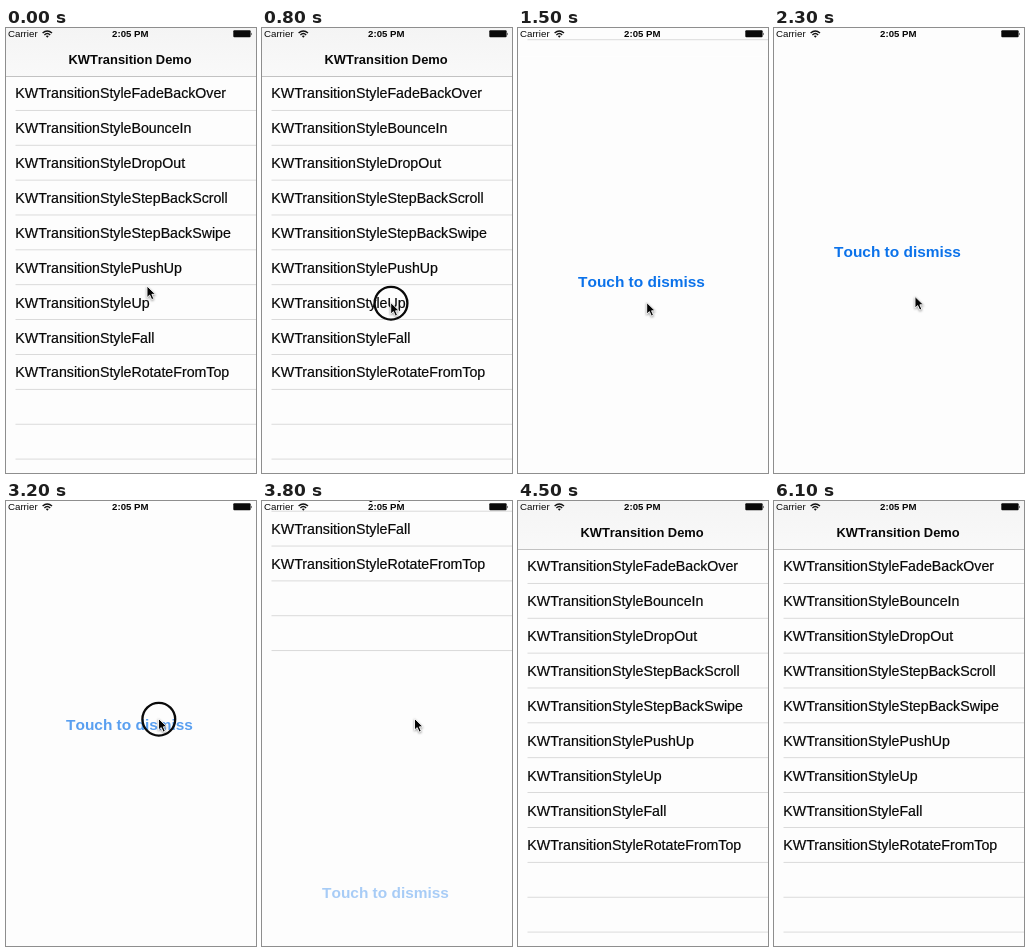
Recreate the animation shown at these times as an HTML page. Size 250 by 445 pixels, loop 6200 ms.

```html
<!DOCTYPE html>
<html lang="en">
<head>
<meta charset="utf-8">
<title>Transition demo</title>
<style>
  html, body { margin: 0; width: 100%; height: 100%; overflow: hidden; background: #000; }
  svg { display: block; width: 100vw; height: 100vh; }
  text { font-family: "Liberation Sans", Arial, sans-serif; font-kerning: none; fill: #080808; }
  .row { font-size: 14.2px; font-kerning: normal; stroke: #080808; stroke-width: 0.2px; }
  .title { font-size: 12.9px; font-weight: bold; text-anchor: middle; }
  .status { font-size: 9.7px; }
  .time { font-size: 9.65px; font-weight: bold; text-anchor: middle; }
  .dismiss { font-size: 15.45px; font-weight: bold; text-anchor: middle; fill: #0b72ea; }
  #cursor { filter: drop-shadow(0 1px 0.8px rgba(0, 0, 0, 0.4)); }
</style>
</head>
<body>
<svg viewBox="0 0 250 445">
  <defs>
    <linearGradient id="bar" x2="0" y2="1">
      <stop stop-color="#f4f4f4"/><stop offset="1" stop-color="#f9f9f9"/>
    </linearGradient>
    <linearGradient id="dark" x2="0" y2="1">
      <stop stop-opacity="0.14"/><stop offset="1" stop-opacity="0"/>
    </linearGradient>
  </defs>
  <rect width="250" height="445"/>
  <g id="list">
    <rect y="-2" width="250" height="453" fill="#fdfdfd"/>
    <rect y="-2" width="250" height="50.5" fill="url(#bar)"/>
    <rect id="shade" y="-2" width="250" height="50.5" fill="url(#dark)"/>
    <rect y="48" width="250" height="0.8" fill="#b4b4b4"/>
    <text class="title" x="124.1" y="35.6">KWTransition Demo</text>
    <g id="rows"></g>
  </g>
  <g id="modal">
    <rect y="-2" width="250" height="450" fill="#fdfdfd"/>
    <text id="dismiss" class="dismiss" x="123.5" y="228.6">Touch to dismiss</text>
  </g>
  <g id="status">
    <text class="status" x="2" y="9.3">Carrier</text>
    <g fill="none" stroke="#111" stroke-width="1.4">
      <path d="M36.6 5.1Q41.3 0.9 46 5.1"/>
      <path d="M38.4 6.9Q41.3 4.3 44.2 6.9"/>
    </g>
    <path d="M39.8 8.1Q41.3 6.9 42.8 8.1L41.3 9.7Z" fill="#111"/>
    <text class="time" x="124.3" y="9.3">2:05 PM</text>
    <rect x="227.3" y="2.3" width="17.3" height="7" rx="1" fill="#0a0a0a"/>
    <path d="M245.1 4.4Q246.6 5.9 245.1 7.4Z" fill="#0a0a0a"/>
  </g>
  <circle id="ring" r="16.4" fill="none" stroke="#0a0a0a" stroke-width="2.3"/>
  <path id="cursor" d="M0 0V11.6L2.7 9.1L4.7 13.6L6.8 12.7L4.9 8.3H8.5Z"
        fill="#050505" stroke="#fff" stroke-width="0.9" stroke-linejoin="round"/>
</svg>
<script>
const LOOP = 6200, STEP = 100;
const SCREEN = 450;               // travel of a full-screen slide
const OPEN = 1340.7, CLOSE = 3740.7;
const ROW_TOP = 48, ROW_H = 34.87;
const styles = ["FadeBackOver", "BounceIn", "DropOut", "StepBackScroll", "StepBackSwipe",
                "PushUp", "Up", "Fall", "RotateFromTop"];
const PICKED = styles.indexOf("Up");

const $ = id => document.getElementById(id);
const show = (el, on) => el.setAttribute("visibility", on ? "visible" : "hidden");
const move = (el, x, y) => el.setAttribute("transform", `translate(${x} ${y})`);
const clamp = v => Math.min(1, Math.max(0, v));
const within = (t, a, b) => t >= a && t < b;

function buildRows() {
  let out = "";
  for (let i = 1; i <= 11; i++) {
    out += `<rect x="9.5" y="${ROW_TOP + i * ROW_H - 0.9}" width="241" height="0.8" fill="#d2d2d2"/>`;
  }
  out += `<rect id="picked" y="${ROW_TOP + PICKED * ROW_H - 0.9}" width="250" height="${ROW_H + 0.8}" fill="#c9c9c9"/>`;
  styles.forEach((name, i) => {
    out += `<text class="row" x="9.3" y="${ROW_TOP + (i + 0.5) * ROW_H + 5}">KWTransitionStyle${name}</text>`;
  });
  $("rows").innerHTML = out;
}

// Underdamped spring from 0 to 1, damping ratio 0.8
function spring(ms) {
  if (ms <= 0) return 0;
  if (ms > 440) return 1;
  const q = 0.0202 * ms;
  return 1 - Math.exp(-0.8 * q) * (Math.cos(0.6 * q) + 4 / 3 * Math.sin(0.6 * q));
}

// Pointer path: time, x, y
const path = [
  [0, 141, 258], [400, 128.7, 274.5], [2000, 128.7, 274.5], [2300, 141, 268.5],
  [2600, 152.5, 217.5], [3800, 152.5, 217.5], [4000, 152.5, 214],
  [4300, 152.5, 214], [4400, 137, 209]
];

function pointer(t) {
  const i = path.findIndex(k => k[0] > t);
  if (i < 0) return path[path.length - 1].slice(1);
  const [t0, x0, y0] = path[i - 1], [t1, x1, y1] = path[i];
  const u = (t - t0) / (t1 - t0);
  return [x0 + (x1 - x0) * u, y0 + (y1 - y0) * u];
}

function draw(time) {
  const t = Math.floor((time % LOOP) / STEP) * STEP;
  const back = t >= CLOSE;
  const p = spring(t - (back ? CLOSE : OPEN));
  const listY = SCREEN * (back ? p - 1 : -p);

  move($("list"), 0, listY);
  move($("modal"), 0, listY + SCREEN);
  show($("picked"), within(t, 900, 2000));
  // the translucent bar darkens as black shows above it
  $("shade").setAttribute("opacity", clamp(listY / 6.5));
  $("dismiss").setAttribute("opacity", 1 - 0.65 * clamp((t - 3100) / 200));

  const [x, y] = pointer(t);
  move($("cursor"), x, y);
  move($("ring"), x + 0.3, y + 0.7);
  show($("cursor"), t < 4500);
  show($("ring"), within(t, 800, 1400) || within(t, 3100, 3800));
}

buildRows();
const start = performance.now();
function tick() {
  draw(performance.now() - start);
  requestAnimationFrame(tick);
}
tick();
</script>
</body>
</html>
```
